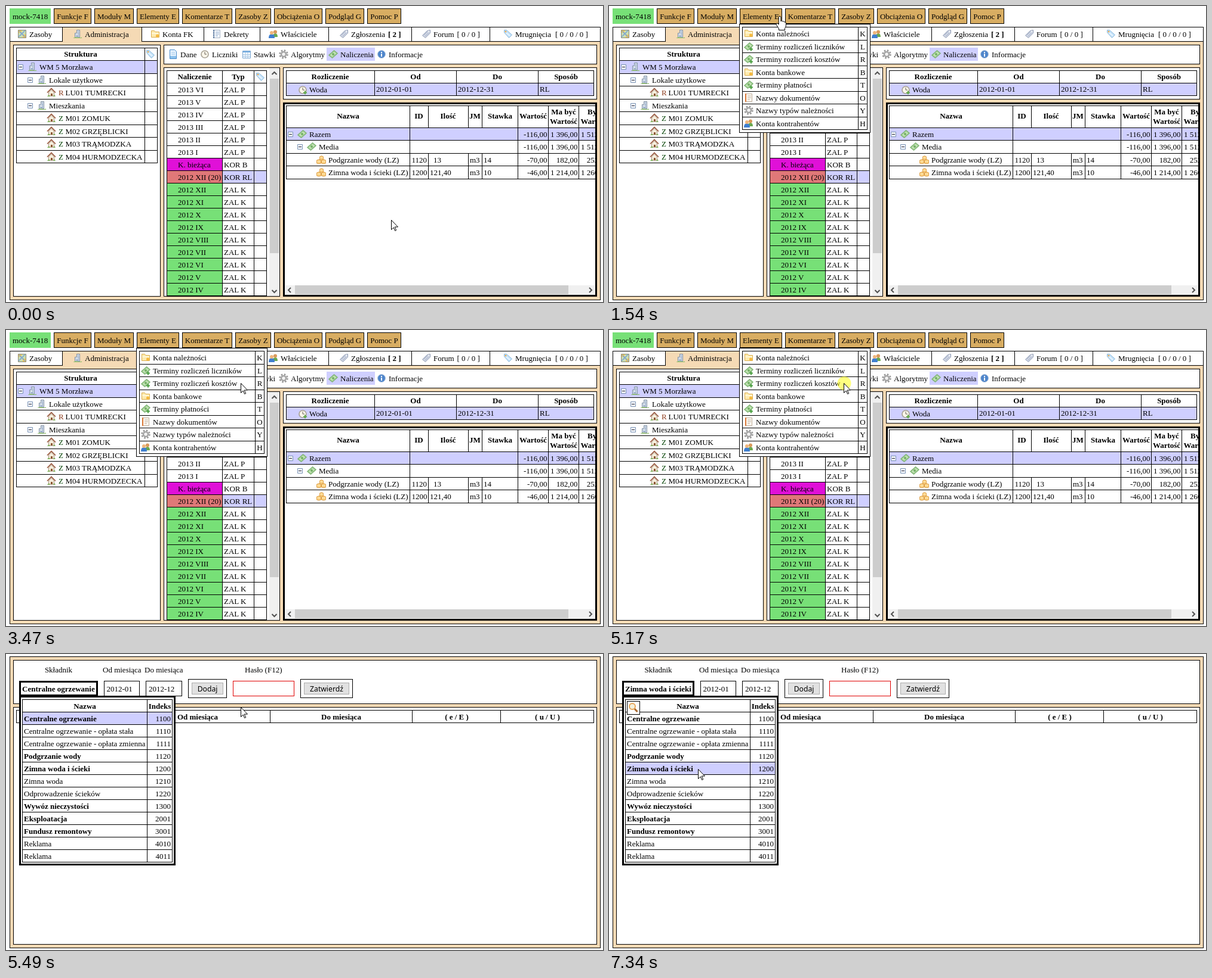
Animation, 1000 px wide and 497 px high, one loop 8 s. Source, as an HTML page:

```html
<!DOCTYPE html>
<html lang="pl">
<head>
<meta charset="utf-8">
<title>Naliczenia</title>
<style>
html, body { margin: 0; width: 100%; height: 100%; overflow: hidden; background: #fff; }
svg { display: block; }
text { font: 13px "Liberation Serif", "Times New Roman", serif; white-space: pre; }
.b { font-weight: bold; }
.m { text-anchor: middle; }
.r { text-anchor: end; }
.ui { font: 12.2px "Noto Sans", sans-serif; }

/* One percent is 80 ms. */
.cut, #cursor { animation: 8s step-end infinite; }
#main { animation-name: main; }
#menu { animation-name: menu; }
#blank { animation-name: blank; }
#panels { animation-name: panels; }
#formA { animation-name: formA; }
#formB { animation-name: formB; }
#heads { animation-name: heads; }
#list, #rows { animation-name: list; }
#rowA { animation-name: rowA; }
#rowB { animation-name: formB; }
#lens { animation-name: lens; }
#click { animation-name: click; }
#arrow { animation-name: arrow; }
#hand { animation-name: hand; }
#beam { animation-name: beam; }
#cursor { animation-name: move; }

@keyframes main { 0% { visibility: visible } 65.5%, 100% { visibility: hidden } }
@keyframes menu { 0% { visibility: hidden } 18.25% { visibility: visible } 65.5%, 100% { visibility: hidden } }
@keyframes blank { 0% { visibility: hidden } 65.5% { visibility: visible } 66.625%, 100% { visibility: hidden } }
@keyframes panels { 0% { visibility: hidden } 66.625%, 100% { visibility: visible } }
@keyframes heads { 0% { visibility: hidden } 67.625%, 100% { visibility: visible } }
@keyframes formA { 0% { visibility: hidden } 67.625% { visibility: visible } 91.75%, 100% { visibility: hidden } }
@keyframes formB { 0% { visibility: hidden } 91.75%, 100% { visibility: visible } }
@keyframes list { 0% { visibility: hidden } 68.625%, 100% { visibility: visible } }
@keyframes rowA { 0% { visibility: hidden } 68.625% { visibility: visible } 91.75%, 100% { visibility: hidden } }
@keyframes lens { 0% { visibility: hidden } 80%, 100% { visibility: visible } }
@keyframes click {
  0%, 19.25%, 65.5%, 91.75%, 100% { visibility: hidden }
  17.25%, 64.625%, 90.75% { visibility: visible }
}
@keyframes arrow { 0%, 37.5%, 100% { visibility: visible } 12.5% { visibility: hidden } }
@keyframes hand { 0%, 28.8%, 100% { visibility: hidden } 12.5% { visibility: visible } }
@keyframes beam { 0%, 37.5%, 100% { visibility: hidden } 28.8% { visibility: visible } }
@keyframes move {
  0% { transform: translate(645px, 359px) }
  3.875% { transform: translate(645px, 359px); animation-timing-function: steps(3, start) }
  6.7625% { transform: translate(600px, 395px); animation-timing-function: steps(5, start) }
  11.575% { transform: translate(335px, 80px); animation-timing-function: steps(3, start) }
  14.37% { transform: translate(288px, 18px) }
  14.375% { transform: translate(286px, 17px) }
  26.875% { transform: translate(286px, 17px); animation-timing-function: steps(11, start) }
  37.46% { transform: translate(351px, 89px) }
  37.5% { transform: translate(560px, 165px) }
  38.44% { transform: translate(801px, 264px) }
  39.375% { transform: translate(700px, 220px) }
  40.31% { transform: translate(500px, 130px) }
  41.25% { transform: translate(390px, 90px) }
  43.375% { transform: translate(393px, 89px) }
  75.25% { transform: translate(393px, 89px); animation-timing-function: steps(3, start) }
  78.14% { transform: translate(335px, 115px); animation-timing-function: steps(5, start) }
  82.95% { transform: translate(185px, 180px); animation-timing-function: steps(3, start) }
  85.84% { transform: translate(150px, 192px) }
  86%, 100% { transform: translate(149px, 193px) }
}
</style>
</head>
<body>
<svg id="stage" width="1000" height="497" viewBox="0 0 1000 497">
  <defs>
    <g id="map"><path d="M1.500 1.500h13v13h-13z" fill="#c9deb2" stroke="#8a8a78"/><path d="M2 2h5v4H2zM9 9h5v5H9z" fill="#f2c75b"/><path d="M2 13L13 2M3 3l10 10" stroke="#7ba3d6" stroke-width="1.500"/></g>
    <g id="building"><path d="M3.500 13.500V6.500h3v-5h5v12z" fill="#dfe6ee" stroke="#7d8ea3"/><path d="M8 4h2M8 6.500h2M8 9h2M5 9h1M5 11.500h5" stroke="#5878a8"/><path d="M1 14.500q4-2 7-1t7 0v1.500H1z" fill="#8fbf6a"/></g>
    <g id="folder"><path d="M1.500 13.500v-11h5l1.500 2h6.500v9z" fill="#fdeaae" stroke="#dcae4c"/><path d="M2 7h12" stroke="#fff6d5" stroke-width="2"/><circle cx="11.500" cy="11" r="2.500" fill="#f6b93f"/></g>
    <g id="notes"><path d="M3.500 1.500h10v13h-10z" fill="#f3f7fc" stroke="#a7b4c5"/><path d="M6 5h6M6 8h6M6 11h4" stroke="#89a3c6"/><path d="M3 1v14" stroke="#4f6f99" stroke-width="2" stroke-dasharray="2 1"/></g>
    <g id="names"><path d="M3.500 1.500h10v13h-10z" fill="#fffaf2" stroke="#bbaa98"/><path d="M6 5h6M6 8h6M6 11h4" stroke="#b5a89a"/><path d="M3 1v14" stroke="#d97736" stroke-width="2"/></g>
    <g id="people"><path d="M7 13q0-6 4-6t4 6z" fill="#6aa84f"/><circle cx="11" cy="4.500" r="3" fill="#d99a5b"/><path d="M0 15q0-7 5-7t5 7z" fill="#3f7fd0"/><circle cx="5" cy="6" r="3" fill="#efb67c"/></g>
    <g id="tag"><path d="M1.500 10.500l8-8 5-1v5l-8 8z" fill="#d3d9e6" stroke="#8e9ab3"/><path d="M4 10l6-6M6 12l6-6" stroke="#9aa6c0"/><circle cx="12.500" cy="3.500" r="1" fill="#fff"/></g>
    <g id="blueTag"><path d="M1.500 5.500v-4h4l9 8-5 5z" fill="#c4e2f8" stroke="#8ab8dc"/><path d="M5 6l6 5" stroke="#e7f4ff" stroke-width="2"/><circle cx="4" cy="4" r="1.300" fill="#f0a43c"/></g>
    <g id="house"><path d="M3.500 14V8L8 3.500 12.500 8v6z" fill="#f6eedd" stroke="#a28c74"/><path d="M1 8.500l7-7 7 7" fill="none" stroke="#9c5a40" stroke-width="1.700"/><path d="M7 10h3v4H7z" fill="#8b5a34"/><path d="M1 15q3-4 5-.5M11 15q2-4 4-.5" fill="#6fac46"/></g>
    <g id="money"><path d="M.500 9.500l9-8 6 5-9 8z" fill="#9ccb8c" stroke="#6ba563"/><path d="M3 9.500l6.500-5.500 3.500 2.500-6.500 5.500z" fill="#c6e4ba"/><circle cx="8" cy="8" r="2" fill="#74b066"/></g>
    <g id="moneyAdd"><use href="#money"/><path d="M9 12.500h6M12 9.500v6" stroke="#4c9f43" stroke-width="2"/></g>
    <g id="clock"><circle cx="8" cy="8" r="6" fill="#faf6ea" stroke="#aaa396" stroke-width="1.700"/><path d="M8 4v4h3" fill="none" stroke="#6b6259"/></g>
    <g id="clockAdd"><use href="#clock"/><path d="M9 12.500h6M12 9.500v6" stroke="#62aa4a" stroke-width="2"/></g>
    <g id="page"><path d="M2.500.500h8l3 3v12h-11z" fill="#e4f1fd" stroke="#4b8ccb"/><path d="M5 5h6M5 8h6" stroke="#a4c9ea"/><path d="M3 11h10v4H3z" fill="#8cc1ec"/></g>
    <g id="sheet"><path d="M1.500 2.500h13v12h-13z" fill="#f5faff" stroke="#7ba7d1"/><path d="M2 4h12" stroke="#7bb2e4" stroke-width="2"/><path d="M2 8.500h12M2 11.500h12M6 5v9M10 5v9" stroke="#a8c7e2"/></g>
    <g id="gear"><circle cx="8" cy="8" r="6.500" fill="none" stroke="#999" stroke-width="2.500" stroke-dasharray="2.600 2.500"/><circle cx="8" cy="8" r="4" fill="#f3f3f3" stroke="#a5a5a5" stroke-width="2.500"/></g>
    <g id="info"><circle cx="8" cy="8" r="6.500" fill="#4f86cb" stroke="#b6c8df"/><path d="M8 4v2M8 7v5" stroke="#fff" stroke-width="2"/></g>
    <g id="coins" fill="#fbd283" stroke="#dfa048"><path d="M5.500 3q3-2.500 6 0v5h-6zM.500 9q3.500-2.500 7 0v5q-3.500 2-7 0zM8.500 9q3.500-2.500 7 0v5q-3.500 2-7 0z"/><path d="M6 4.500h5M1 11h6M9 11h6" stroke="#ffeab8"/></g>
    <g id="minus"><path d="M.500.500h8v8h-8z" fill="#f3f6fb" stroke="#7b93b5"/><path d="M2 4.500h5" stroke="#223"/></g>
  </defs>
</svg>
<script>
const PEACH = '#f5dab5', LILAC = '#cfcfff', GREEN = '#77e077', TAN = '#d8ad62';
const BASE = 16; // text baseline below the top line of a table row

const text = (x, y, s, cls = '', fill = '#000') => `<text x="${x}" y="${y}" class="${cls}" fill="${fill}">${s}</text>`;
const fill = (x1, y1, x2, y2, c) => `<rect x="${x1}" y="${y1}" width="${x2 - x1}" height="${y2 - y1}" fill="${c}"/>`;
const box = (x1, y1, x2, y2, c = '#fff', line = '#000') =>
  `<rect x="${x1 + .5}" y="${y1 + .5}" width="${x2 - x1}" height="${y2 - y1}" fill="${c}" stroke="${line}"/>`;
const thick = (x1, y1, x2, y2) => fill(x1, y1, x2, y2, '#000') + fill(x1 + 3, y1 + 3, x2 - 3, y2 - 3, '#fff');
const icon = (id, x, y) => `<use href="#${id}" x="${x}" y="${y}"/>`;
const group = (id, s) => `<g id="${id}" class="cut">${s}</g>`;
const each = (list, f) => list.map(f).join('');
const range = (n, f) => Array.from({ length: n }, (_, i) => f(i));
const lines = d => `<path d="${d}" fill="none" stroke="#000"/>`;
const chevron = d => `<path d="${d}" fill="none" stroke="#505050" stroke-width="2"/>`;

// Rows with icons are 21.5 px high and snap to whole pixels.
const iconRows = (top, n) => range(n + 1, i => Math.floor(top + 21.5 * i));

function grid(xs, ys) {
  const [l, r, t, b] = [xs[0], xs.at(-1), ys[0], ys.at(-1)];
  return lines(each(xs, x => `M${x + .5} ${t}V${b + 1}`) + each(ys, y => `M${l} ${y + .5}H${r + 1}`));
}

function toolbar() {
  const items = [['Funkcje F', 80, 142], ['Moduły M', 148, 213], ['Elementy E', 219, 289], ['Komentarze T', 295, 378],
    ['Zasoby Z', 384, 443], ['Obciążenia O', 449, 529], ['Podgląd G', 535, 599], ['Pomoc P', 605, 661]];
  return fill(6, 4, 75, 30, GREEN) + text(11, 22, 'mock-7418') +
    each(items, ([s, l, r]) => box(l, 4, r, 29, TAN) + text((l + r + 1) / 2, 22, s, 'm'));
}

function tabs() {
  const xs = [6, 94, 227, 331, 425, 540, 679, 810, 995];
  const items = [['map', 19, 'Zasoby'], ['building', 112, 'Administracja'], ['folder', 242, 'Konta FK'], ['notes', 345, 'Dekrety'],
    ['people', 440, 'Właściciele'], ['tag', 558, 'Zgłoszenia'], ['tag', 696, 'Forum'], ['blueTag', 833, 'Mrugnięcia']];
  return box(6, 59, 995, 493, PEACH) + fill(6, 35, 995, 59, '#fff') + grid(xs, [35, 59]) + fill(95, 36, 227, 60, PEACH) +
    each(items, ([id, x, s]) => icon(id, x, 39) + text(x + 20, 52, s)) +
    text(640, 52, '[ 2 ]', 'b') + text(755.5, 52, '[ 0 / 0 ]') + text(920, 52, '[ 0 / 0 / 0 ]');
}

function tree() {
  const ys = iconRows(70, 9);
  const rows = [[0, 'WM 5 Morzława'], [1, 'Lokale użytkowe'], [2, 'LU01 TUMRECKI', 'R'], [1, 'Mieszkania'], [2, 'M01 ZOMUK', 'Z'],
    [2, 'M02 GRZĘBLICKI', 'Z'], [2, 'M03 TRĄMODZKA', 'Z'], [2, 'M04 HURMODZECKA', 'Z']];
  return box(12, 65, 258, 487) + fill(17, ys[1], 253, ys[2], LILAC) + grid([17, 232, 253], ys) +
    text(125, 85, 'Struktura', 'b m') + icon('blueTag', 234, 73) +
    each(rows, ([depth, s, mark], i) => {
      const x = 20 + 16 * depth, y = ys[i + 1];
      return mark
        ? icon('house', 68, y + 3) + text(88, y + BASE, mark, '', mark === 'R' ? '#8b3a1a' : '#004000') + text(99.5, y + BASE, s)
        : icon('minus', x, y + 7) + icon('building', x + 16, y + 3) + text(x + 36, y + BASE, s);
    });
}

function subTabs() {
  const items = [['page', 272, 'Dane'], ['clock', 325, 'Liczniki'], ['sheet', 395, 'Stawki'], ['gear', 457, 'Algorytmy'],
    ['money', 540, 'Naliczenia'], ['info', 621, 'Informacje']];
  return box(264, 65, 989, 97) + fill(537, 70, 618, 92, LILAC) +
    each(items, ([id, x, s]) => icon(id, x, 73) + text(x + 20, 86, s));
}

function periods() {
  const roman = 'XII XI X IX VIII VII VI V IV'.split(' ');
  const rows = [...roman.slice(-3), 'III', 'II', 'I'].map(m => ['2013 ' + m, 'ZAL P'])
    .concat([['K. bieżąca', 'KOR B', '#e010d8'], ['2012 XII (20)', 'KOR RL', '#e07878']], roman.map(m => ['2012 ' + m, 'ZAL K', GREEN]));
  const ys = range(18, i => 129 + 21 * i);
  return box(264, 103, 458, 487) + fill(362, ys[7], 436, ys[8], LILAC) +
    each(rows, ([s, type, c], i) =>
      (c ? fill(269, ys[i], 362, ys[i + 1], c) : '') + text(288, ys[i] + BASE, s) + text(365, ys[i] + BASE, type)) +
    grid([269, 362, 415, 436], [108, ...ys]) +
    text(316, 123, 'Naliczenie', 'b m') + text(389, 123, 'Typ', 'b m') + icon('blueTag', 418, 111) +
    fill(441, 104, 458, 487, '#f0f0f0') + fill(442, 122, 457, 415, '#cdcdcd') +
    chevron('M445.500 115l4-4 4 4M445.500 477l4 4 4-4');
}

function settlement() {
  const heads = [['Rozliczenie', 543], ['Od', 686], ['Do', 823], ['Sposób', 938]];
  return box(464, 103, 989, 156) + fill(469, 130, 984, 151, LILAC) + grid([469, 617, 754, 891, 984], [108, 129, 150]) +
    each(heads, ([s, x]) => text(x, 123, s, 'b m')) + icon('clockAdd', 489, 133) +
    text(508, 145, 'Woda') + text(620, 144, '2012-01-01') + text(757, 144, '2012-12-31') + text(894, 144, 'RL');
}

function charges() {
  const ys = [167, ...iconRows(204, 4)];
  const heads = [['Nazwa', 573], ['ID', 691.5], ['Ilość', 740.5], ['JM', 785.5], ['Stawka', 827.5], ['Wartość', 883]];
  const rows = [['Razem', '-116,00', '1 396,00', '1 512,00'], ['Media', '-116,00', '1 396,00', '1 512,00'],
    ['Podgrzanie wody (LZ)', '-70,00', '182,00', '252,00', '1120', '13', '14'],
    ['Zimna woda i ścieki (LZ)', '-46,00', '1 214,00', '1 260,00', '1200', '121,40', '10']];
  const body = fill(469, ys[1], 990, ys[2], LILAC) + grid([469, 676, 857, 908, 959, 1011], ys) +
    lines(each([707, 774, 797], x => `M${x + .5} ${ys[0]}V${ys[1]}M${x + .5} ${ys[3]}V${ys[5]}`)) +
    each(heads, ([s, x]) => text(x, 189, s, 'b m')) +
    text(934, 182, 'Ma być', 'b m') + text(934, 198, 'Wartość', 'b m') + text(974, 182, 'Było', 'b') + text(962.5, 198, 'Wartość', 'b') +
    each(rows, ([s, a, b, c, id, qty, rate], i) => {
      const y = ys[i + 1], base = y + BASE, x = 472 + 16 * i;
      const name = id
        ? icon('coins', 520, y + 3) + text(540, base, s) + text(679.5, base, id) +
          text(id === '1120' ? 716 : 710, base, qty) + text(777, base, 'm3') + text(800, base, rate)
        : icon('minus', x, y + 7) + icon('money', x + 16, y + 3) + text(x + 36, base, s);
      return name + text(906.5, base, a, 'r') + text(957.5, base, b, 'r') + text(1008.5, base, c, 'r');
    }) +
    fill(467, 469, 987, 485, '#f0f0f0') + fill(484, 469, 942, 484, '#cdcdcd') +
    chevron('M477 473l-4 4 4 4M977 473l4 4-4 4');
  return thick(464, 162, 990, 488) + `<svg x="467" y="165" width="520" height="320" viewBox="467 165 520 320">${body}</svg>`;
}

function menu() {
  const ys = iconRows(35.5, 8);
  const items = [['folder', 'Konta należności', 'K'], ['moneyAdd', 'Terminy rozliczeń liczników', 'L'], ['moneyAdd', 'Terminy rozliczeń kosztów', 'R'],
    ['folder', 'Konta bankowe', 'B'], ['moneyAdd', 'Terminy płatności', 'T'], ['names', 'Nazwy dokumentów', 'O'],
    ['gear', 'Nazwy typów należności', 'Y'], ['people', 'Konta kontrahentów', 'H']];
  return box(218, 30, 437, 212) + grid([223, 417, 432], ys) +
    each(items, ([id, s, key], i) => icon(id, 226, ys[i] + 3) + text(246, ys[i] + BASE, s) + text(425, ys[i] + BASE, key, 'm'));
}

function form(value, dx) {
  const button = (x, w, s) => box(x, 42, x + w, 73) + box(x + 6, 48, x + w - 6, 67, '#e1e1e1', '#adadad') + text(x + w / 2 + .5, 63, s, 'ui m');
  return text(88 + dx / 2, 31, 'Składnik', 'm') + thick(22, 45, 154 + dx, 71) + text(27, 63, value, 'b') +
    `<g transform="translate(${dx})">` +
    text(162, 31, 'Od miesiąca') + text(232, 31, 'Do miesiąca') + text(400, 31, 'Hasło (F12)') +
    box(164, 45, 223, 70) + text(168.5, 63, '2012-01') + box(234, 45, 294, 70) + text(239, 63, '2012-12') +
    button(305, 64, 'Dodaj') + box(380, 45, 482, 70, '#fff', '#e00000') + button(493, 87, 'Zatwierdź') + '</g>';
}

function heads() {
  const items = [['Od miesiąca', 321], ['Do miesiąca', 561.5], ['( e / E )', 755], ['( u / U )', 907]];
  return grid([17, 200, 442, 680, 828, 984], [94, 115]) + each(items, ([s, x]) => text(x, 110, s, 'b m'));
}

function list() {
  const rows = [['Centralne ogrzewanie', 1100, 'b'], ['Centralne ogrzewanie - opłata stała', 1110], ['Centralne ogrzewanie - opłata zmienna', 1111],
    ['Podgrzanie wody', 1120, 'b'], ['Zimna woda i ścieki', 1200, 'b'], ['Zimna woda', 1210], ['Odprowadzenie ścieków', 1220],
    ['Wywóz nieczystości', 1300, 'b'], ['Eksploatacja', 2001, 'b'], ['Fundusz remontowy', 3001, 'b'], ['Reklama', 4010], ['Reklama', 4011]];
  const ys = range(14, i => 76 + 21 * i);
  const marked = i => fill(27, ys[i + 1], 279, ys[i + 2], LILAC);
  return group('list', thick(22, 70, 284, 355)) + group('rowA', marked(0)) + group('rowB', marked(4)) +
    group('rows', grid([27, 236, 278], ys) + text(132, 92, 'Nazwa', 'b m') + text(257.5, 92, 'Indeks', 'b m') +
      each(rows, ([s, id, cls], i) => text(30, ys[i + 1] + BASE, s, cls) + text(276, ys[i + 1] + BASE, id, 'r')));
}

const lens = box(30, 79, 51, 101) +
  '<path d="M42 91l5.500 6" stroke="#a8672c" stroke-width="3"/><circle cx="39" cy="88" r="5" fill="#f4f0dc" stroke="#e8a65a" stroke-width="2"/>';

const cursor = `<g id="cursor">
  <circle id="click" class="cut" cx="1" cy=".5" r="11.500" fill="#ff0" fill-opacity=".5"/>
  <path id="arrow" class="cut" d="M.500.500V16.500L4.200 13 6.700 18.500 8.700 17.500 6.200 12H11.500Z" fill="#fff" stroke="#000"/>
  <path id="hand" class="cut" d="M-1.800 14V2A1.800 1.800 0 0 1 1.800 2V8.500Q3.500 7 5 9 7 8 8 10 10.500 9.500 10.500 12V16Q10 19 8.500 20.500V23.500H-1.500V21L-5.800 14.500Q-6.500 11.500-3.800 12Z" fill="#fff" stroke="#000"/>
  <path id="beam" class="cut" d="M-3-7.500h3M1-7.500h3M.500-7V7M-3 7.500h3M1 7.500h3" fill="none" stroke="#000"/>
</g>`;

document.getElementById('stage').insertAdjacentHTML('beforeend',
  group('main', toolbar() + tabs() + tree() + subTabs() + periods() + settlement() + charges()) +
  group('menu', menu()) +
  group('blank', fill(0, 0, 1000, 497, '#f9f9f9')) +
  group('panels', box(6, 4, 995, 493, PEACH) + box(12, 10, 989, 83) + box(12, 89, 989, 487)) +
  group('formA', form('Centralne ogrzewanie', 0)) +
  group('formB', form('Zimna woda i ścieki', -11)) +
  group('heads', heads()) + list() + group('lens', lens) + cursor);
</script>
</body>
</html>
```
